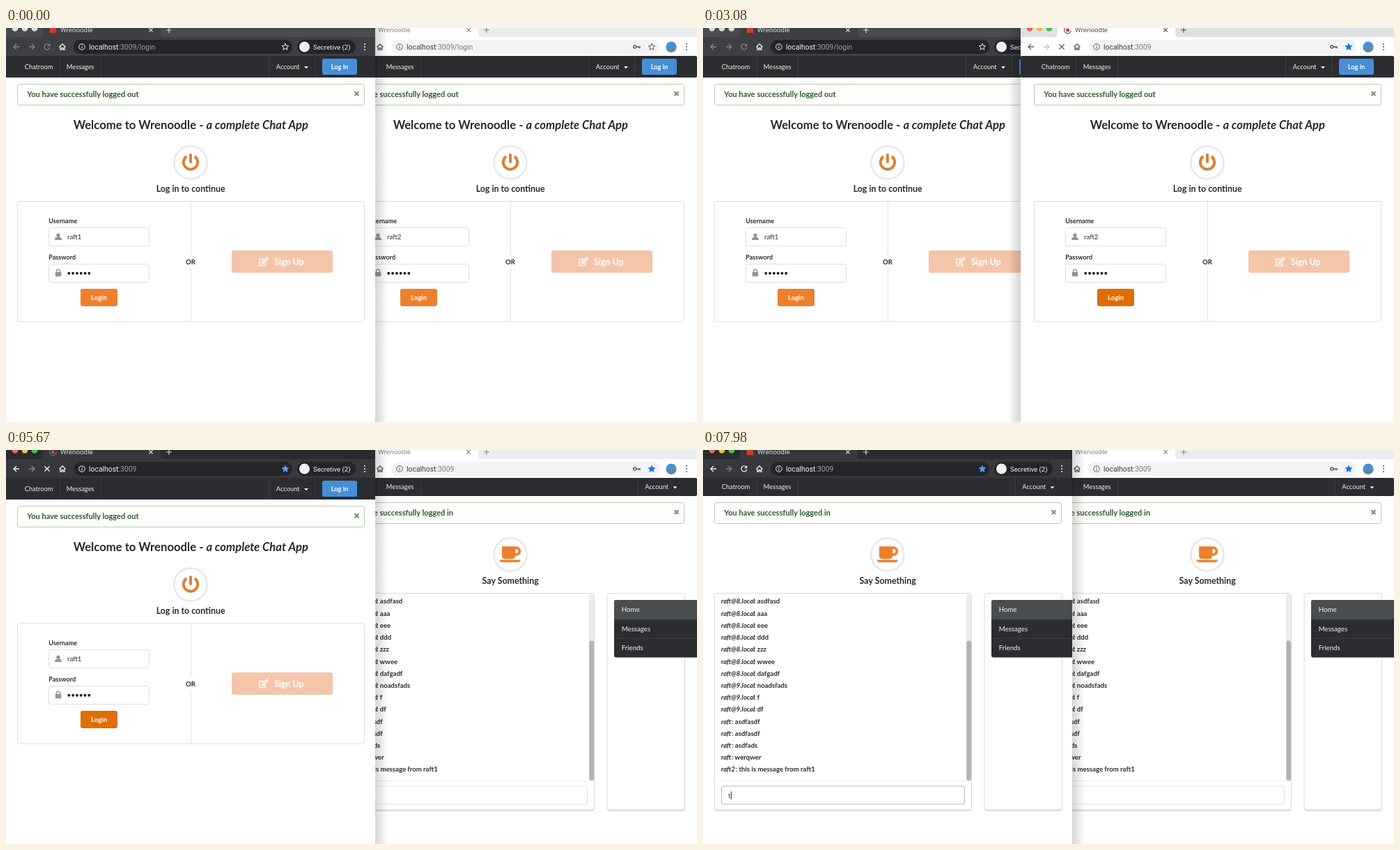
Write an HTML page that moves like this. It is 992 px wide and 565 px high and loops after 8 s.

```html
<!DOCTYPE html>
<html lang="en">
<head>
<meta charset="utf-8">
<title>Chat login</title>
<style>
html, body { margin: 0; width: 100%; height: 100%; overflow: hidden; background: #fff; }
svg { display: block; }
#stage { width: 100vw; height: 100vh; }
text { white-space: pre; }
.page { font-family: Lato, sans-serif; }
.bar { font-family: Roboto, sans-serif; }
</style>
</head>
<body>
<svg id="stage" viewBox="0 0 992 565" xmlns="http://www.w3.org/2000/svg"></svg>
<script>
const LOOP = 8000;
const APP = 'Wrenoodle';
const INK = '#292a2c', NAV = '#2b2d30', ORANGE = '#ee802c', POWER = '#dc7f33';
const stage = document.getElementById('stage');

// [sender, x of the colon, message]
const MAIL = 73, SHORT = 41, LONG = 46.7;
const chat = [
  ...['asdfasd', 'aaa', 'eee', 'ddd', 'zzz', 'wwee', 'dafgadf'].map(m => ['raft@8.local', MAIL, m]),
  ...['noadsfads', 'f', 'df'].map(m => ['raft@9.local', MAIL, m]),
  ...['asdfasdf', 'asdfasdf', 'asdfads', 'werqwer'].map(m => ['raft', SHORT, m]),
  ['raft2', LONG, 'this is message from raft1']
];

const attrs = o => Object.entries(o).map(([k, v]) => ` ${k}="${v}"`).join('');
const rect = (x, y, w, h, fill, o = {}) =>
  `<rect x="${x}" y="${y}" width="${w}" height="${h}" fill="${fill}"${attrs(o)}/>`;
const circle = (x, y, r, fill, o = {}) =>
  `<circle cx="${x}" cy="${y}" r="${r}" fill="${fill}"${attrs(o)}/>`;
const fillPath = (d, fill) => `<path d="${d}" fill="${fill}"/>`;
const line = (d, stroke, w = 1, o = {}) =>
  `<path d="${d}" fill="none" stroke="${stroke}" stroke-width="${w}"${attrs(o)}/>`;
const text = (x, y, s, size, fill, o = {}) =>
  `<text x="${x}" y="${y}" font-size="${size}" fill="${fill}"${attrs(o)}>${s}</text>`;
const bold = (x, y, s, size, fill = INK, o = {}) =>
  text(x, y, s, size, fill, { 'font-weight': 700, ...o });
const mid = { 'text-anchor': 'middle' };
const at = (x, y, s) => `<g transform="translate(${x} ${y})">${s}</g>`;
const cross = (x, y, r, c, w) =>
  line(`M${x - r} ${y - r}l${2 * r} ${2 * r}m0 ${-2 * r}l${-2 * r} ${2 * r}`, c, w);
const box = (x, y, w, h, stroke, r = 3) => rect(x, y, w, h, '#fff', { rx: r, stroke });

function star(x, y, fill, stroke) {
  const pts = Array.from({ length: 10 }, (_, i) => {
    const r = i % 2 ? 2.2 : 5, a = i * Math.PI / 5;
    return `${(x + r * Math.sin(a)).toFixed(2)},${(y - r * Math.cos(a)).toFixed(2)}`;
  });
  return `<polygon points="${pts.join(' ')}" fill="${fill}" stroke="${stroke}" stroke-width="1"/>`;
}

const arrow = (x, dir, c) =>
  line(`M${x - 4 * dir} 27h${8 * dir}m${-4 * dir} -4l${4 * dir} 4l${-4 * dir} 4`, c, 1.3);

function reload(x, c) {
  return line(`M${x + 3} 24.2A4 4 0 1 0 ${x + 3.9} 28`, c, 1.3) +
    fillPath(`M${x + 4.4} 22v4.2h-4.2z`, c);
}

function browserBar(w) {
  const { dark, active, width } = w;
  const frame = dark ? (active ? '#292b2e' : '#494b4e') : (active ? '#dfe1e5' : '#ebecee');
  const tool = dark ? (active ? '#37383c' : '#3e3f43') : '#ffffff';
  const pill = dark ? '#242529' : '#f1f3f4';
  const icon = dark ? '#eceded' : '#5c6064';
  const faint = dark ? '#85878a' : '#bfc1c4';
  const main = active || !dark ? icon : faint;
  const strong = dark ? '#f0f1f2' : '#3b3d40';
  const lights = active ? ['#f25f57', '#f6bd3b', '#3dc54a'] : Array(3).fill(dark ? '#dcdcdc' : '#cfcfcf');
  const title = dark ? '#d5d7d9' : active ? '#4c4f53' : '#85888c';
  const home = 'M76.5 27.2L81 23l4.5 4.2M78 26.5v4.7h2v-2.6h2v2.6h2v-4.7';

  let s = rect(0, 0, width, 14, frame) + rect(0, 13, width, 27, tool) +
    fillPath('M47 14Q53 14 53 8V0H222V8Q222 14 228 14Z', tool) +
    lights.map((c, i) => circle(13 + 14 * i, 0.3, 4.4, c)).join('');

  s += w.loading
    ? circle(67.5, 3, 2.6, '#d8402e') +
      line('M67.5 -1.8A4.8 4.8 0 1 1 62.7 3', '#596b80', 1.4, { transform: `rotate(${w.spin} 67.5 3)` })
    : rect(62.7, -2, 9.6, 9.2, '#d53a2c');
  s += text(78, 6.2, APP, 9.8, title) + cross(208, 3, 2.7, title, 1.2) +
    line('M230 3h8m-4 -4v8', title, 1.2);

  s += arrow(15, -1, main) + arrow(37, 1, faint) +
    (w.loading ? cross(59, 27, 3.6, icon, 1.4) : reload(59, main)) +
    line(home, icon, 1.3);
  s += rect(97, 17, dark ? 314 : 385, 20, pill, { rx: 10 }) +
    circle(109, 27, 4.3, 'none', { stroke: icon, 'stroke-width': 1 }) +
    line('M109 26.4v3M109 24.2v1.2', icon, 1.1);
  const path = ':3009' + (w.away ? '' : '/login');
  s += text(119, 30.6, `localhost<tspan fill="${dark ? '#9b9fa4' : '#777b80'}">${path}</tspan>`, 10.4, strong);

  const blue = dark ? '#5b9df5' : '#1a73e8';
  s += star(dark ? 401 : 471, 27.2, w.away ? blue : 'none', w.away ? blue : icon);
  if (dark) {
    s += rect(418, 17, 84, 20, pill, { rx: 10 }) + circle(428.5, 27, 7.5, '#f1f1f2') +
      text(441, 30.6, 'Secretive (2)', 9.6, '#f1f1f2');
  } else {
    s += circle(446.7, 27, 2, 'none', { stroke: icon, 'stroke-width': 1.5 }) +
      line('M448.7 27h5.3v2.2m-2 -2v1.6', icon, 1.5) +
      circle(499, 27, 7.6, '#4b8fd2') +
      fillPath('M491.9 30Q499 27.5 506.1 30A7.6 7.6 0 0 1 491.9 30Z', '#5d8a8f');
  }
  const dotX = dark ? 515 : 521;
  s += [23, 27, 31].map(y => circle(dotX, y, 1.1, icon)).join('');
  return `<g class="bar">${s}</g>`;
}

function nav(home) {
  const h = home ? 26 : 31, y = home ? 56 : 58.7, shift = home ? 70.5 : 0;
  const rule = x => line(`M${x} 40v${h}`, '#3c3e41');
  const label = (x, s) => text(x, y, s, 9.3, '#f1f1f1');
  let s = rect(-3, 40, 536, h, NAV, { rx: 2 }) + rule(77) + rule(136.5) + rule(377.5 + shift) +
    label(26.8, 'Chatroom') + label(86.8, 'Messages') + label(387.8 + shift, 'Account') +
    fillPath(`M${428 + shift} ${y - 3.7}h6l-3 3.2z`, '#f1f1f1');
  if (!home) {
    s += rule(443.5) + rect(454, 44, 50, 23, '#468fd6', { rx: 3 }) +
      bold(479, 58.7, 'Log in', 9.2, '#fff', mid);
  }
  return s;
}

function notice(y, word) {
  return rect(16.5, y, 498, 30, '#fefffd', { rx: 3, stroke: '#bcc9b4' }) +
    bold(30.3, y + 18.6, `You have successfully logged ${word}`, 11.05, '#2d5a2c') +
    cross(503.5, y + 13.6, 2.9, '#6f9868', 2.2);
}

const badge = y => circle(265, y, 23.6, '#fff', { stroke: '#e7e7e8', 'stroke-width': 2.4 });

function field(y, focus, content) {
  return box(61.5, y, 144, 26, focus ? '#a4a9ae' : '#dddee0') + content;
}

function loginPage(w) {
  const person = circle(75, 297.2, 2.7, '#949494') +
    fillPath('M70.2 304v-1.4q0-2.6 2.6-2.6h4.4q2.6 0 2.6 2.6v1.4z', '#949494');
  const lockInk = w.focus ? '#27282a' : '#949494';
  const lock = rect(70.7, 350, 8.6, 6.3, lockInk, { rx: 1 }) +
    line('M72.5 350.5v-1.8a2.5 2.5 0 0 1 5 0v1.8', lockInk, 1.4);
  const dots = Array.from({ length: 6 }, (_, i) => circle(90.3 + 5.8 * i, 351.7, 1.95, '#222')).join('');
  const button = { hover: '#f27606', press: '#e06d02' }[w.button] || ORANGE;
  const pencil = line('M372.5 337v3.5h-8.5v-9h6', '#fff', 1.5) +
    line('M367.5 337.5l.5-2.3 6.5-6.2 1.7 1.8-6.4 6.3z', '#fff', 1.5);

  return nav(false) + notice(80.5, 'out') +
    bold(265.4, 144.8, `Welcome to ${APP} - <tspan font-style="italic">a complete Chat App</tspan>`, 16.7, INK, mid) +
    badge(193) +
    line('M259.1 184.2A10.2 10.2 0 1 0 270.9 184.2', POWER, 3.9) +
    line('M265 182v10', POWER, 3.9, { 'stroke-linecap': 'round' }) +
    bold(265.2, 234.6, 'Log in to continue', 12.4, INK, mid) +
    box(16.5, 248.5, 498, 172.5, '#dcdee0') +
    line('M265.5 249v77M265.5 344v77', '#e0e1e2') +
    bold(265, 338.5, 'OR', 9.6, INK, mid) +
    bold(61.3, 280.2, 'Username', 9.05) +
    field(286.5, false, person + text(88, 303, w.user, 9.7, '#27282a')) +
    bold(61.3, 332, 'Password', 9.05) +
    field(338.5, w.focus, lock + dots) +
    rect(107, 374, 53, 25, button, { rx: 3 }) +
    bold(133.6, 389.9, 'Login', 9.6, '#fff', mid) +
    rect(324, 319, 145, 32, '#f4c5a9', { rx: 3 }) + pencil +
    bold(385, 339.7, 'Sign Up', 12.4, '#fff');
}

function card(x, w) {
  return rect(x, 206.5, w, 311.5, '#dcdddf', { rx: 4 }) + box(x, 205.5, w, 310.5, '#d9dadc', 4);
}

function homePage(w) {
  const cup = fillPath('M253 138.3h20.5a6.7 6.7 0 0 1 0 13.4h-1.2q-.7 4.5-5 4.5h-9.5q-4.8 0-4.8-4.8z' +
    'M272.4 142v6h1.1a3 3 0 0 0 0-6z', ORANGE) +
    fillPath('M249.5 157.5h30.3q-.6 3.6-4 3.6h-22.3q-3.4 0-4-3.6z', ORANGE);
  const lines = chat.map(([who, x, msg], i) => {
    const y = (220.4 + 17.21 * i).toFixed(1);
    return bold(26, y, who, 9.5, INK, { 'font-style': 'italic' }) + bold(x, y, ': ' + msg, 9.6);
  }).join('');
  const menu = rect(414, 215, 140, 82.5, NAV, { rx: 3 }) +
    fillPath('M414 243v-25q0-3 3-3h137v28z', '#4b4e51') + line('M414 270.5h140', '#3c3e41') +
    ['Home', 'Messages', 'Friends'].map((s, i) => text(424.7, 232.3 + 27.5 * i, s, 9.7, '#f4f4f4')).join('');

  return nav(true) + notice(75.5, 'in') + badge(150) + cup +
    bold(265.2, 192, 'Say Something', 12.4, INK, mid) +
    card(16.5, 369) + rect(378, 206, 7, 268, '#ececec') +
    rect(378.3, 273.5, 6.8, 200.5, '#b2b3b4', { rx: 3 }) +
    line('M16.5 474.5h361.5', '#ededee') + lines +
    box(26.5, 482, 349, 26, w.typing ? '#b3b6b9' : '#dfe0e2') +
    text(36.2, 498.6, w.typed, 9.7, '#27282a') +
    (w.caret ? rect(w.typed ? 40 : 36.5, 489.5, 0.9, 11.5, '#222') : '') +
    card(404, 111.5) + menu;
}

function browser(w) {
  const page = w.home ? homePage(w) : loginPage(w);
  return `<svg x="${w.x}" y="0" width="${w.width}" height="565">` +
    rect(0, 0, w.width, 565, '#fff') + `<g class="page">${at(w.inset, 0, page)}</g>` + browserBar(w) + '</svg>';
}

const shade = '<defs><linearGradient id="shade"><stop offset="0" stop-opacity=".16"/>' +
  '<stop offset=".6" stop-opacity=".07"/><stop offset="1" stop-opacity="0"/></linearGradient></defs>';
const shadow = (x, dir) =>
  `<g transform="translate(${x} 0) scale(${dir} 1)">${rect(0, 0, 18, 565, 'url(#shade)')}</g>`;

// Login steps of one window; each value is a time in ms.
function session(t, { focus, hover, press, done }) {
  return {
    focus: t >= focus && t < press,
    button: t >= press ? 'press' : t >= hover ? 'hover' : '',
    loading: t >= press && t < done,
    spin: (t - press) * 0.36 % 360,
    away: t >= press,
    home: t >= done
  };
}

const SWAP = 980, BACK = 4200, TYPE = 7000, KEY = 7980;

function draw(t) {
  const rightFront = t >= SWAP && t < BACK;
  const left = {
    x: 0, width: 530, inset: 0, dark: true, user: 'raft1', active: t >= BACK,
    typing: t >= TYPE, typed: t >= KEY ? 't' : '',
    caret: t >= KEY || (t >= TYPE && t < TYPE + 500),
    ...session(t, { focus: 4620, hover: 5180, press: 5460, done: 5740 })
  };
  const right = {
    x: 456, width: 536, inset: 3, dark: false, user: 'raft2', active: rightFront,
    typed: '',
    ...session(t, { focus: 1400, hover: 1960, press: 2800, done: 3220 })
  };
  return shade + (rightFront
    ? browser(left) + shadow(456, -1) + browser(right)
    : browser(right) + shadow(530, 1) + browser(left));
}

const start = performance.now();
let shown = '';

function tick() {
  const next = draw((performance.now() - start) % LOOP);
  if (next !== shown) stage.innerHTML = shown = next;
  requestAnimationFrame(tick);
}
tick();
</script>
</body>
</html>
```
